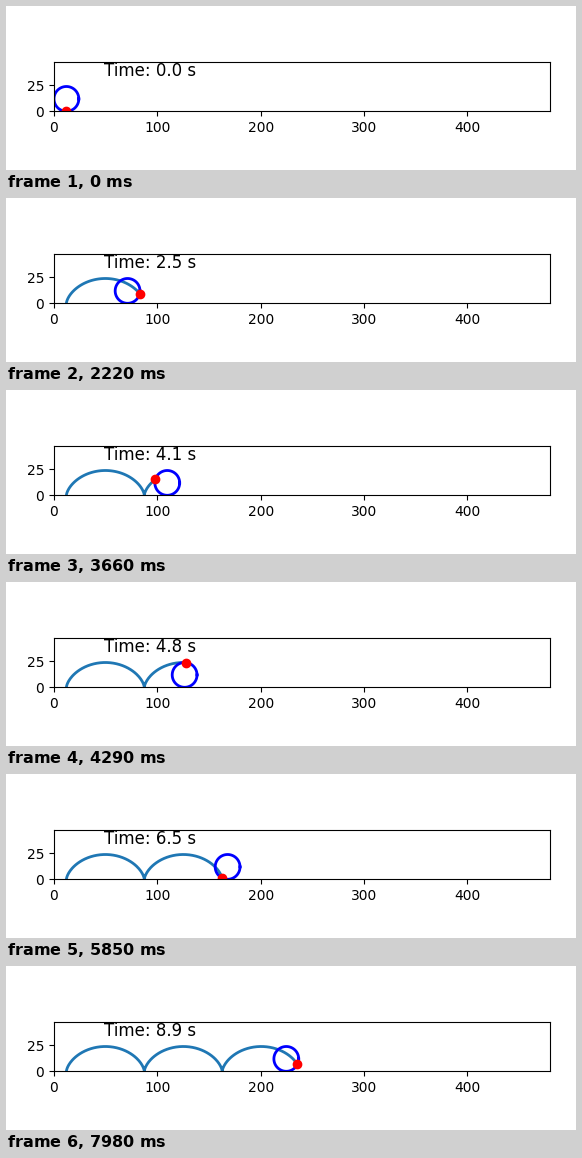
A matplotlib script for the animation above (8000 ms loop, 570 by 164 pixels).

```python
import numpy as np
import matplotlib.pyplot as plt
from matplotlib.animation import FuncAnimation

W, H, DPI = 570, 164, 100
FRAMES, LOOP_MS = 267, 8000
FPS = 30          # steps per simulated second
R, OMEGA = 12, 2  # wheel radius and angular speed

plt.rcParams["font.family"] = "DejaVu Sans"

fig = plt.figure(figsize=(W / DPI, H / DPI), dpi=DPI, facecolor="white")
ax = fig.add_axes([48 / W, 58.7 / H, 496 / W, 49.6 / H])
ax.set(xlim=(0, 40 * R), ylim=(0, 4 * R),
       xticks=range(0, 401, 100), yticks=[0, 25])

trace, = ax.plot([], [], lw=2, color="C0")
wheel, = ax.plot([], [], lw=2, color="blue")
dot, = ax.plot([], [], "o", color="red")
label = ax.text(0.1, 35.3 / 49.6, "", fontsize=12, transform=ax.transAxes)

ring = np.linspace(0, 2 * np.pi, 100)
theta = OMEGA * np.arange(FRAMES) / FPS
center = R + R * theta
path_x = center - R * np.sin(theta)
path_y = R - R * np.cos(theta)


def update(i):
    trace.set_data(path_x[:i + 1], path_y[:i + 1])
    wheel.set_data(center[i] + R * np.cos(ring), R + R * np.sin(ring))
    dot.set_data([path_x[i]], [path_y[i]])
    label.set_text(f"Time: {i / FPS:.1f} s")
    return trace, wheel, dot, label


def init():
    return update(0)


anim = FuncAnimation(fig, update, frames=FRAMES, init_func=init,
                     interval=LOOP_MS / FRAMES, repeat=True, repeat_delay=0)
plt.show()
```
